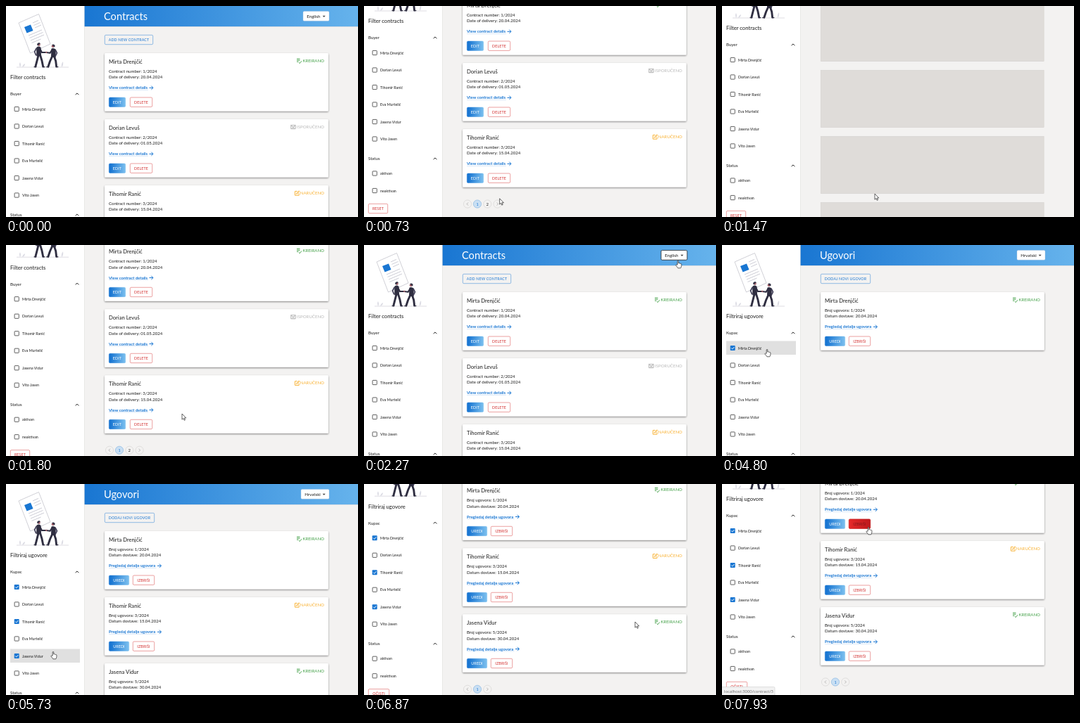
Recreate the animation shown at these times as an HTML page. Size 500 by 300 pixels, loop 8 s.

```html
<!DOCTYPE html>
<html lang="en">
<head>
<meta charset="utf-8">
<title>Contracts</title>
<style>
  html, body { margin: 0; width: 100%; height: 100%; overflow: hidden; background: #f3f2f1; }
  svg { display: block; width: 100vw; height: 100vh; font-family: Lato, sans-serif; }
</style>
</head>
<body>
<svg viewBox="0 0 500 300">
  <defs>
    <linearGradient id="bar"><stop stop-color="#1976d2"/><stop offset="1" stop-color="#66b3ec"/></linearGradient>
    <linearGradient id="edit"><stop offset=".1" stop-color="#1976d2"/><stop offset="1" stop-color="#7cc0ef"/></linearGradient>
    <linearGradient id="danger"><stop stop-color="#e62a2a"/><stop offset="1" stop-color="#bd181c"/></linearGradient>
    <filter id="lift" x="-5%" y="-10%" width="110%" height="130%">
      <feDropShadow dx="0" dy="1.1" stdDeviation="1" flood-opacity=".48"/>
    </filter>
    <g id="art">
      <path d="M18 24L46.500 11.500L63 54L34.500 67Z" fill="#fff" stroke="#c4c4cc" stroke-width=".8"/>
      <path d="M26 30L35 26.500L38.500 35L29.500 38.500Z" fill="#1976d2"/>
      <path d="M38 24l8-3.500M39.500 27.500l9-4M41 31l9-4M32 42l19-8M33.500 45.500l19-8M35 49l19-8M36.500 52.500l13-5.500" stroke="#cdcdd6" stroke-width="1"/>
      <path d="M15 87H89" stroke="#c9c8d2" stroke-width=".6"/>
      <path d="M20 87q-2-4 0-7q2 4 0 7M23 87q1-4 4-5q0 4-4 5M79 87q-1-5 2-8q1 5-2 8" fill="#dcdce4"/>
      <g transform="translate(5 10.500) scale(.9 .88)">
        <g fill="none" stroke="#2f2e41" stroke-linecap="round" stroke-linejoin="round">
          <path d="M46 66L43.500 76L41 86M48 66L51 76L53 86M68 68L64 77L61 86M70 68L73 77L74 86" stroke-width="3.200"/>
          <path d="M39 86.500h3M53 86.500h2.500M58.500 86.500h3M74 86.500h2.500" stroke-width="1.500"/>
          <path d="M48 57L51 63L58 63M67 59L64 64L58 63" stroke-width="2.400"/>
        </g>
        <path d="M42.500 55Q46 52 49.500 55L50 69H42.500ZM66 57Q69 55 73 58L73 71H65.500Z" fill="#2f2e41"/>
        <path d="M42.500 56L39.500 62L42 68M72.500 59L75 64L72.500 69" fill="none" stroke="#3f3d56" stroke-width="1.800"/>
        <circle cx="46.500" cy="50.500" r="2.100" fill="#a0616a"/><circle cx="68.500" cy="53" r="2.100" fill="#a0616a"/>
        <path d="M43.500 51q0-4 4-3.500l1.500 1.500q-3 0-3.500 3ZM71.500 54q1-4-3-4l-2 1.500q3 0 3.500 3Z" fill="#2f2e41"/>
        <circle cx="58" cy="63" r="1.300" fill="#a0616a"/>
      </g>
    </g>
    <path id="arrow" d="M0 0V8.200L1.900 6.500L3.200 9.300L4.500 8.700L3.200 6H5.800Z" fill="#fff" stroke="#222" stroke-width=".7"/>
    <path id="hand" d="M1.200 6.200V.9Q2 -.4 2.800 .9V4Q3.700 3.300 4.300 4.200Q5.200 3.600 5.700 4.600Q6.700 4.300 6.900 5.400V7.500Q6.800 9 5.800 10.800H1.900Q.8 9-1.200 6.900Q-.8 5.200 1.200 6.200Z" fill="#fff" stroke="#222" stroke-width=".7"/>
  </defs>
  <g id="stage"></g>
</svg>
<script>
const LOOP = 8000;
const BLUE = '#1976d2', RED = '#d32f2f', INK = '#1c1c1c';
const stage = document.getElementById('stage');

const people = ['Mirta Drenjčić', 'Dorian Levuš', 'Tihomir Ranić', 'Eva Murtelić', 'Jasena Vidur', 'Vito Jasen'];
const dates = ['20.04', '01.05', '15.04', '08.05', '30.04', '12.05'];
const states = ['made', 'sent', 'ordered', 'sent', 'made', 'ordered'];

const stateStyles = {
  made: { label: 'KREIRANO', color: '#43a047', x: 412.5, icon: 'M.5 1H5M.5 3H5M.5 5H3M3.500 6.300L4.800 7.300L7.500 4' },
  sent: { label: 'ISPORUČENO', color: '#b9b9b9', x: 404.2, icon: 'M.5 1.200H7V6.500H.5ZL3.700 4L7 1.200M1 2.200L3.700 4.600L6.500 2.200M1 5.700H6.500' },
  ordered: { label: 'NARUČENO', color: '#f8b133', x: 409.7, icon: 'M4 1.200H.8V7H6.500V4M2.800 5L3.200 3.700L6.400.6L7.300 1.500L4.100 4.600Z' }
};

const words = {
  en: { title: 'Contracts', add: 'ADD NEW CONTRACT', addW: 69, filter: 'Filter contracts', buyer: 'Buyer',
    number: 'Contract number', date: 'Date of delivery', link: 'View contract details', arrowX: 204,
    edit: 'EDIT', editW: 24, del: 'DELETE', delX: 176, delW: 32, reset: 'RESET', resetW: 28, lang: 'English', langX: 422 },
  hr: { title: 'Ugovori', add: 'DODAJ NOVI UGOVOR', addW: 71, filter: 'Filtriraj ugovore', buyer: 'Kupac',
    number: 'Broj ugovora', date: 'Datum dostave', link: 'Pregledaj detalje ugovora', arrowX: 215.5,
    edit: 'UREDI', editW: 29, del: 'IZBRIŠI', delX: 180, delW: 31, reset: 'OČISTI', resetW: 30, lang: 'Hrvatski', langX: 419 }
};

// [time, value...] keys
const scrollKeys = [[60, 0], [480, 80], [1400, 80], [1470, 70], [1800, 70], [2080, 0], [6470, 0], [6930, 80]];
const cursorKeys = [
  [60, 506, 200], [500, 300, 240], [800, 176, 279], [930, 176, 279], [1200, 162, 279], [1380, 162, 279],
  [1470, 217, 267], [1670, 250, 240], [1800, 250, 240], [2200, 444, 22], [2600, 444, 22], [2670, 444, 24],
  [2930, 445, 45], [3150, 445, 45], [3800, 73, 171], [3930, 73, 171], [4130, 62, 146], [4730, 62, 146],
  [4800, 62, 148], [5000, 64, 193], [5470, 64, 193], [5600, 65, 238], [5760, 65, 238], [6070, 385, 196],
  [7200, 385, 196], [7560, 200, 130], [7840, 206, 61]
];
const checks = [[4200, 0], [5050, 2], [5620, 4]];

const clamp = v => Math.max(0, Math.min(1, v));
const ramp = (t, a, b) => clamp((t - a) / (b - a));
const smooth = p => p * p * (3 - 2 * p);

function track(keys, t, ease = p => p) {
  let i = 0;
  while (i < keys.length - 1 && keys[i + 1][0] <= t) i++;
  const a = keys[i], b = keys[Math.min(i + 1, keys.length - 1)];
  const p = a === b ? 0 : ease(ramp(t, a[0], b[0]));
  return a.slice(1).map((v, k) => v + (b[k + 1] - v) * p);
}

const text = (x, y, s, size, fill = INK, more = '') =>
  `<text x="${x}" y="${y}" font-size="${size}" fill="${fill}" ${more}>${s}</text>`;
const rect = (x, y, w, h, fill, more = '') =>
  `<rect x="${x}" y="${y}" width="${w}" height="${h}" fill="${fill}" ${more}/>`;
const path = (d, color, width = 0.8, more = '') =>
  `<path d="${d}" fill="none" stroke="${color}" stroke-width="${width}" ${more}/>`;
const button = (x, y, w, label, color, fill = 'none', line = color) =>
  rect(x + .3, y + .3, w - .6, 13.4, fill, `rx="1.500" stroke="${line}" stroke-opacity=".65" stroke-width=".7"`) +
  text(x + w / 2, y + 9, label, 5.3, color, 'text-anchor="middle" letter-spacing=".15"');

function card(i, y, w, hot) {
  const s = stateStyles[states[i]];
  return `<g transform="translate(0 ${y})">` +
    rect(140, 0, 318, 82.5, '#fff', 'rx="1.500" filter="url(#lift)"') +
    text(146, 15, people[i], 7.65) +
    text(146, 27.8, `${w.number}: ${i + 1}/2024`, 6.05) +
    text(146, 36.3, `${w.date}: ${dates[i]}.2024`, 6.05) +
    text(146, 51.4, w.link, 5.9, BLUE, 'font-weight="bold"') +
    path(`M146 52.600H${w.arrowX - 2}`, BLUE, .4, 'opacity=".4"') +
    path(`M${w.arrowX - .5} 49.300h5.400m-2.500-2.600l2.600 2.600l-2.600 2.600`, BLUE, 1) +
    button(146, 62.7, w.editW, w.edit, '#fff', 'url(#edit)', 'url(#edit)') +
    button(w.delX, 62.7, w.delW, w.del, RED) +
    (hot ? `<g opacity="${hot}">${button(w.delX, 62.7, w.delW, w.del, '#84181b', 'url(#danger)', '#c01c1c')}</g>` : '') +
    path(s.icon, s.color, .95, `transform="translate(${s.x} 7.200)"`) +
    text(452, 12.7, s.label, 6.1, s.color, 'text-anchor="end"') + '</g>';
}

const skeleton = k => rect(140.2, 67.2 + 94 * k, 317, 81.5, '#dfdcd9', 'stroke="#d3d0cd" stroke-width=".5"');

function pager(count, page) {
  const circle = (x, on) => `<circle cx="${x}" cy="361.500" r="5.600" fill="${on ? '#c9dff3' : 'none'}" stroke="${on ? '#7fb0e0' : '#d2d0cf'}" stroke-width=".6"/>`;
  const end = 161 + 14.3 * count;
  let s = circle(147, false) + circle(end, false) +
    path(`M148 359.500l-2 2l2 2M${end - 1} 359.500l2 2l-2 2`, '#999', .7);
  for (let n = 0; n < count; n++) {
    const x = 161 + 14.3 * n;
    s += circle(x, n === page) + text(x, 363.5, n + 1, 5.4, n === page ? BLUE : INK, 'text-anchor="middle"');
  }
  return s;
}

function option(y, label, on, hover) {
  const box = on
    ? rect(11.7, y - 3.5, 7, 7, BLUE, 'rx=".900"') + path(`M13.200 ${y}l1.500 1.600l2.700-3.100`, '#fff', .9)
    : rect(12.1, y - 3.1, 6.2, 6.2, 'none', 'rx=".700" stroke="#444" stroke-width=".850"');
  return (hover ? rect(6, y - 10, 99, 19.5, on ? '#e0e0e0' : '#f4f4f4') : '') + box + text(23, y + 2, label, 5.35);
}

const rowY = i => 146.5 + 24.5 * i;

function sidebar(w, checked, hover) {
  const chevron = y => path(`M98.700 ${y + 1.200}l2.300-2.300l2.300 2.300`, '#222', 1);
  return rect(0, 0, 111, 400, '#fff') + rect(111, 0, .6, 400, '#e2e1e0') + '<use href="#art"/>' +
    text(6, 104.4, w.filter, 7.65) + text(6, 127.3, w.buyer, 6.1) + chevron(125) +
    people.map((p, i) => option(rowY(i), p, checked.includes(i), i === hover)).join('') +
    text(6, 299, 'Status', 6.1) + chevron(297) +
    option(318, 'aktivan') + option(342.5, 'neaktivan') +
    button(6, 361, w.resetW, w.reset, RED);
}

function header(w, focus) {
  const line = focus ? 'stroke="#222" stroke-width=".8"' : 'stroke="#a9bfd8" stroke-width=".4"';
  return rect(111, 0, 389, 29.2, 'url(#bar)') + rect(111, 29.2, 389, .8, '#d3dae1') +
    text(139, 20.1, w.title, 14.6, '#fff') +
    rect(w.langX, 7.6, 459 - w.langX, 13.7, '#fff', `rx="1.500" ${line}`) +
    text(w.langX + 5.2, 16.9, w.lang, 6.2) + '<path d="M449.700 13.800h4l-2 2.200z" fill="#444"/>' +
    button(140, 41, w.addW, w.add, BLUE);
}

function menu(t, y) {
  const shown = Math.min(ramp(t, 2400, 2600), 1 - ramp(t, 3080, 3200));
  if (!shown) return '';
  const item = (top, label, fill) => rect(418, top, 55, 14.5, fill) + text(424, top + 9.3, label, 6.1);
  const low = y > 39;
  return `<g opacity="${shown}">` + rect(418, 22, 55, 35, '#fff', 'rx="1.500" filter="url(#lift)"') +
    item(25, 'English', low ? '#edf4fb' : '#dfebf7') + item(39.5, 'Hrvatski', low ? '#f2f2f2' : '#fff') + '</g>';
}

const inside = (x, y, l, top, r, b) => x >= l && x <= r && y >= top && y <= b;

function render(t) {
  const [scroll] = track(scrollKeys, t);
  const [x, y] = track(cursorKeys, t, smooth);
  const w = t < 3130 ? words.en : words.hr;
  const checked = checks.filter(c => t >= c[0]).map(c => c[1]);
  const loading = (t > 900 && t < 1100) || (t > 1380 && t < 1620);
  const page = t > 900 && t < 1380 ? 1 : 0;
  const list = checked.length ? checked : page ? [3, 4, 5] : [0, 1, 2];
  const row = x >= 6 && x <= 105 ? people.findIndex((p, i) => Math.abs(y + 1 + scroll - rowY(i)) < 10.5) : -1;
  const focus = scroll < 5 && inside(x, y, w.langX, 8, 459, 25);
  const onPager = inside(x, y, 141, 356 - scroll, 195, 367 - scroll);
  const onCard = t > 7200 && (inside(x, y, 146, 126, 221, 135) || inside(x, y, 180, 49, 211, 63));
  const onMenu = t > 2400 && t < 3150;
  const hand = row >= 0 || focus || onPager || onCard || onMenu;
  const hot = ramp(t, 7780, 7920);

  const main = loading
    ? [0, 1, 2, 3, 4].map(skeleton).join('')
    : list.map((id, k) => card(id, 67 + 94 * k, w, k ? 0 : hot)).join('') + pager(checked.length ? 1 : 2, page);
  const tip = ramp(t, 7560, 7660);
  const status = tip ? `<g opacity="${tip}">` +
    rect(-1, 288.5, 76, 13, '#f2f2f2', 'rx="1.500" stroke="#cfcfcf" stroke-width=".6"') +
    text(3, 296.6, 'localhost:3000/contract/3', 5.9, '#666', 'font-family="Open Sans, sans-serif"') + '</g>' : '';
  const cursor = t < 60 ? '' : `<use href="#${hand ? 'hand' : 'arrow'}" x="${x}" y="${y}"/>`;

  stage.innerHTML = rect(0, 0, 500, 300, '#f3f2f1') +
    `<g transform="translate(0 ${-scroll})">${header(w, focus)}${main}${sidebar(w, checked, row)}</g>` +
    menu(t, y) + status + cursor;
}

const start = performance.now();
function tick() {
  render((performance.now() - start) % LOOP);
  requestAnimationFrame(tick);
}
tick();
</script>
</body>
</html>
```
